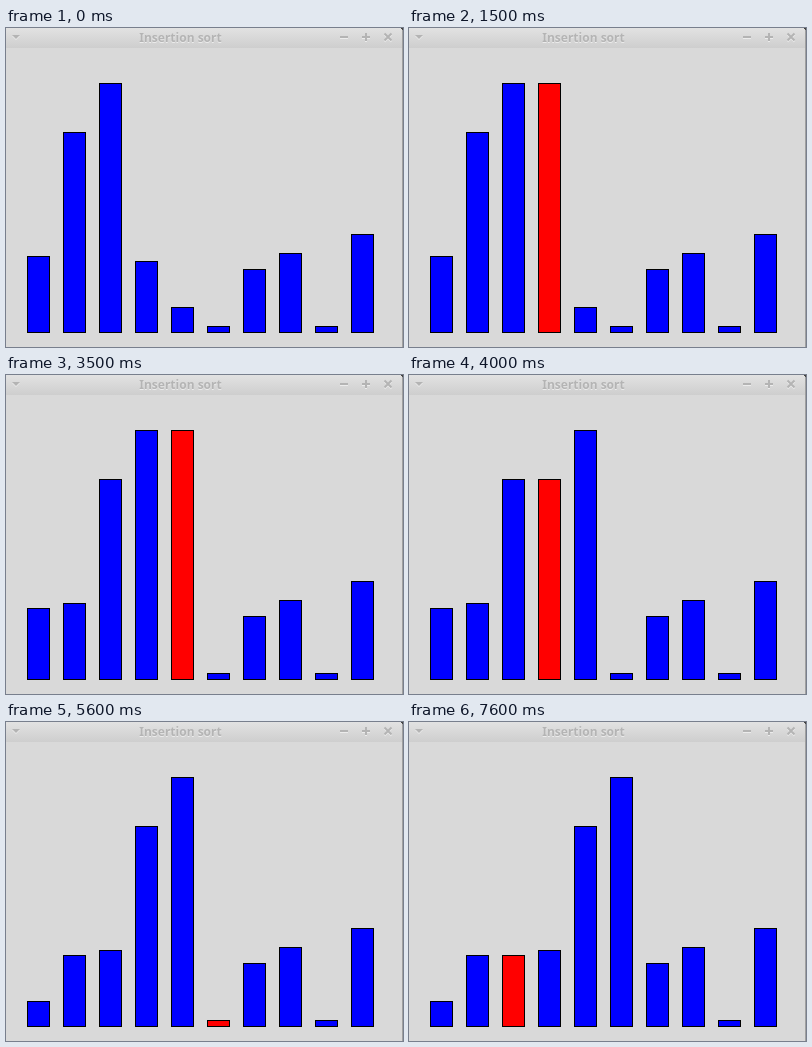
An HTML page for the animation above (8 s loop, 397 px wide and 319 px high).

```html
<!DOCTYPE html>
<html lang="en">
<head>
<meta charset="utf-8">
<title>Insertion sort</title>
<style>
  html, body { margin: 0; width: 100%; height: 100%; overflow: hidden; background: #d9d9d9; }
  svg { display: block; }
  .title { font: bold 12px "Noto Sans", "Open Sans", sans-serif; text-anchor: middle; }
  .bar { fill: #00f; stroke: #000; }
  .bar.active { fill: #f00; }
</style>
</head>
<body>
<svg width="397" height="319" viewBox="0 0 397 319">
  <defs>
    <linearGradient id="chrome" x2="0" y2="1">
      <stop offset="0" stop-color="#e2e2e2"/>
      <stop offset="1" stop-color="#cecece"/>
    </linearGradient>
    <g id="controls">
      <path d="M6 7h8l-4 4z"/>
      <path d="M334 8h8v2h-8zM356 8h3v-3h2v3h3v2h-3v3h-2v-3h-3z"/>
      <path d="M378.5 5.5l7 7m0-7l-7 7" stroke-width="2"/>
    </g>
  </defs>
  <rect width="397" height="319" fill="#d9d9d9"/>
  <rect width="397" height="20" fill="url(#chrome)"/>
  <g fill="#ececec" stroke="#ececec" stroke-width="0" transform="translate(0 1)">
    <use href="#controls"/>
    <text class="title" x="174.5" y="14">Insertion sort</text>
  </g>
  <g fill="#b4b4b4" stroke="#b4b4b4" stroke-width="0">
    <use href="#controls"/>
    <text class="title" x="174.5" y="14">Insertion sort</text>
  </g>
  <path d="M396.5 2v317" stroke="#a0a0a0"/>
  <path d="M395 0h2v2h-1v-1h-1z" fill="#444"/>
  <g id="bars"></g>
</svg>
<script>
  const BASE = 305, LEFT = 21, PITCH = 36, WIDTH = 23;
  const STEP = 500, LOOP = 8000, PAUSE_AFTER = 10, PAUSE = 100;
  const START = [77, 201, 250, 72, 26, 7, 64, 80, 7, 99];

  // Records every key pick and every shift of the sort.
  function sortSteps(values, first, count) {
    const a = [...values];
    const steps = [];
    const record = active => steps.push({ heights: [...a], active });
    record(-1);
    for (let i = first; i < a.length && steps.length < count; i++) {
      const key = a[i];
      let j = i;
      record(i);
      while (j > 0 && a[j - 1] > key) {
        a[j] = a[j - 1];
        record(j);
        j--;
      }
      a[j] = key;
    }
    return steps.slice(0, count);
  }

  const steps = sortSteps(START, 2, 16);
  const bars = START.map((_, i) => {
    const bar = document.createElementNS("http://www.w3.org/2000/svg", "rect");
    bar.setAttribute("x", LEFT + i * PITCH + 0.5);
    bar.setAttribute("width", WIDTH - 1);
    document.getElementById("bars").append(bar);
    return bar;
  });

  function stepAt(time) {
    const pauseStart = (PAUSE_AFTER + 1) * STEP;
    if (time >= pauseStart) time = Math.max(pauseStart - 1, time - PAUSE);
    return Math.min(steps.length - 1, Math.floor(time / STEP));
  }

  let shown = -1;
  function draw() {
    const index = stepAt(performance.now() % LOOP);
    if (index !== shown) {
      shown = index;
      const { heights, active } = steps[index];
      bars.forEach((bar, i) => {
        bar.setAttribute("y", BASE - heights[i] + 0.5);
        bar.setAttribute("height", heights[i] - 1);
        bar.setAttribute("class", i === active ? "bar active" : "bar");
      });
    }
    requestAnimationFrame(draw);
  }
  draw();
</script>
</body>
</html>
```
